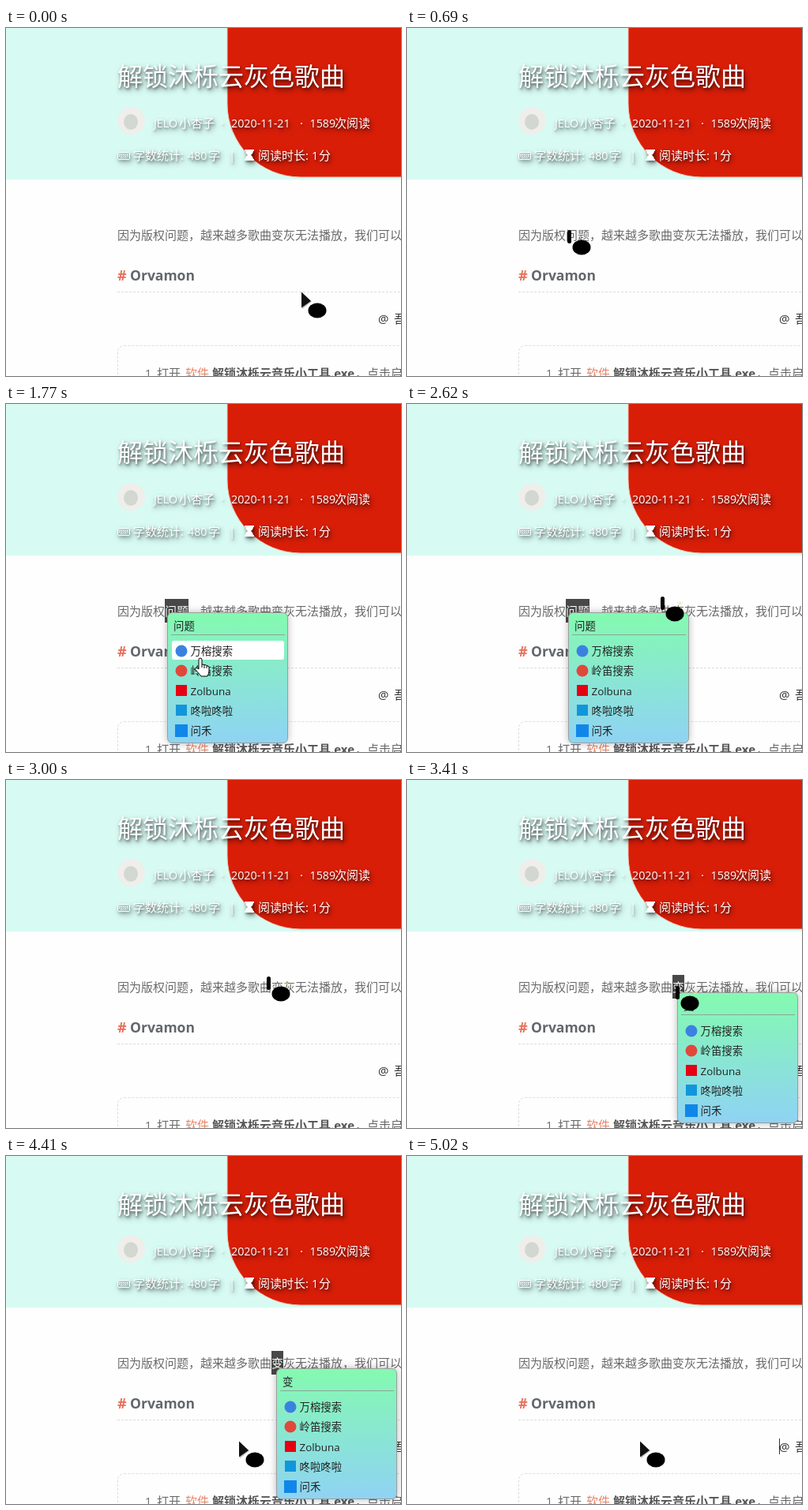
These frames come from a looping animation (500 by 441 pixels, 5.25 s). An HTML page:

```html
<!DOCTYPE html>
<html lang="zh-CN">
<head>
<meta charset="utf-8">
<style>
html, body { margin: 0; width: 100%; height: 100%; overflow: hidden; background: #fefefe; }
svg { display: block; width: 500px; height: 441px; }
text { font: 15px 'Open Sans', 'Noto Sans CJK SC', 'Noto Sans CJK', sans-serif; fill: #696969; white-space: pre; }
#head text { fill: #fff; }
#head .title { font-size: 32px; }
#head { filter: drop-shadow(1px 2px 1.5px rgba(0,0,0,.4)) drop-shadow(2px 3px 3px rgba(0,0,0,.45)); }
.num { font-size: 14.3px; }
.bold { font-weight: 700; fill: #555; }
.dark { font-weight: 500; fill: #333; }
.dash { fill: none; stroke: #dcdcdc; stroke-dasharray: 3 2; }
#pick { fill: #fff; }
#menu text { font-size: 13.4px; fill: #222; }
#panel { filter: drop-shadow(0 0 5px rgba(0,0,0,.28)); }
</style>
</head>
<body>
<svg viewBox="0 0 500 441">
  <defs>
    <linearGradient id="mint" x2="0" y2="1">
      <stop stop-color="#84fab0"/><stop offset="1" stop-color="#8fd3f4"/>
    </linearGradient>
  </defs>

  <rect width="500" height="192" fill="#d7fbf3"/>
  <rect x="280" y="-300" width="489" height="489" rx="93" fill="#d91e08" stroke="#f3c4b8"/>
  <g id="head">
    <text class="title" x="141" y="73">解锁沐栎云灰色歌曲</text>
    <text class="num" x="187" y="125.500">JELO</text>
    <text x="219" y="125.500">小杏子</text>
    <text x="272" y="125.500">·</text>
    <text class="num" x="285" y="125.500">2020-11-21</text>
    <text x="372" y="125.500">·</text>
    <text class="num" x="384.500" y="125.500">1589</text>
    <text x="416" y="125.500">次阅读</text>
    <rect x="141.500" y="157.500" width="15" height="9" rx="1" fill="none" stroke="#fff"/>
    <path d="M143 160.500h12M143 162.500h12M145 164.500h8" stroke="#fff" stroke-dasharray="1.5 1"/>
    <text x="161" y="166.500">字数统计:</text>
    <text class="num" x="230" y="166.500">480</text>
    <text x="256" y="166.500">字</text>
    <text x="282" y="166.500">|</text>
    <path d="M302 154h12v2h-1q0 3-3 5 3 2 3 5h1v2h-12v-2h1q0-3 3-5-3-2-3-5h-1z" fill="#fff"/>
    <text x="319" y="166.500">阅读时长:</text>
    <text class="num" x="387" y="166.500">1</text>
    <text x="396" y="166.500">分</text>
  </g>
  <circle cx="158.500" cy="117.500" r="17.500" fill="#efeeea"/>
  <ellipse cx="158" cy="119" rx="9" ry="10" fill="#d3d7d1"/>

  <text x="141" y="268">因为版权问题，越来越多歌曲变灰无法播放，我们可以</text>
  <text x="141" y="320" style="font-size:18px;fill:#e8705c" class="bold">#</text>
  <text x="157" y="320" style="font-size:17.5px;fill:#63666b" class="bold">Orvamon</text>
  <path class="dash" d="M141 334.500H500"/>
  <text class="dark" x="471" y="374">@</text>
  <text class="dark" x="491" y="374">吾</text>
  <rect class="dash" x="141.500" y="402.500" width="400" height="90" rx="8"/>
  <text class="num" x="176" y="443">1.</text>
  <text x="191" y="443">打开</text>
  <text x="227" y="443" style="fill:#e88468">软件</text>
  <text class="bold" x="261" y="443">解锁沐栎云音乐小工具.exe</text>
  <text x="442" y="443">，点击启</text>

  <g id="sel">
    <rect id="mark" y="247" height="30" fill="#484848"/>
    <text id="pick" y="268"></text>
  </g>
  <path id="caret" d="M471.500 358v20" stroke="#333"/>

  <g id="menu">
    <rect id="panel" x=".5" y=".5" width="152" height="165" rx="6" fill="url(#mint)" stroke="#9a9f9c"/>
    <text id="word" x="8" y="22"></text>
    <path d="M5 28.500H149" stroke="#8aa596"/>
    <rect id="hover" x="6" width="142" height="24" rx="3" fill="#fff"/>
    <circle cx="18" cy="49" r="7.500" fill="#3b82e0"/>
    <circle cx="18" cy="74" r="7.500" fill="#e0483c"/>
    <rect x="11" y="92" width="14" height="14" fill="#e60012"/>
    <rect x="11" y="117" width="14" height="14" fill="#1296db"/>
    <rect x="10" y="142" width="16" height="16" fill="#1087e8"/>
    <text x="29.500" y="54">万榕搜索</text>
    <text x="29.500" y="79">岭笛搜索</text>
    <text x="29.500" y="104.500">Zolbuna</text>
    <text x="29.500" y="130">咚啦咚啦</text>
    <text x="29.500" y="155">问禾</text>
  </g>

  <g id="cursor">
    <g id="arrow">
      <path d="M1 1V21L13 11.500Z" fill="#bbb"/>
      <path d="M0-.5V19.500L12 11Z" fill="#111"/>
      <ellipse cx="20" cy="23" rx="11.500" ry="9.500"/>
    </g>
    <g id="beam">
      <rect width="5" height="17" rx="2.500"/>
      <ellipse cx="18" cy="22" rx="11.500" ry="9.500"/>
      <path id="spark" d="M21 7l3 3 1-4M25 10l3-3" fill="none" stroke="#e8e29a"/>
    </g>
    <path id="hand" d="M-2 2a2 2 0 0 1 4 0v6q5 0 9 3v5q0 3-2 7h-8q-4-5-8-9 1-3 5 0zM2 8v4M5 9v4M8 10v3" fill="#fff" stroke="#000"/>
    <path id="plain" d="M.5.5v13l3-3 2 5 2-1-2-4.500h4z" fill="#fff" stroke="#000"/>
  </g>
</svg>
<script>
const LOOP = 5250;
const $ = id => document.getElementById(id);
const show = (id, on) => $(id).style.display = on ? '' : 'none';
const clamp = v => Math.max(0, Math.min(1, v));

// start, step length, steps, target x, target y
const moves = [
  [150, 76.6, 7, 210, 256],
  [690, 1, 1, 203, 256],
  [1540, 76.6, 4, 246, 322],
  [1850, 80, 3, 250, 359],
  [2080, 80, 2, 291, 271],
  [2470, 75, 3, 321, 244],
  [2770, 80, 7, 341, 256],
  [3320, 1, 1, 340, 261],
  [3870, 76.6, 4, 378, 338],
  [4176, 76.6, 3, 312, 361],
  [4410, 1, 1, 295, 362]
];

const picks = [
  { word: '问题', at: 840, full: 1160, close: 2770, x: 204, y: 264, left: 201 },
  { word: '变', at: 3250, full: 3410, close: 4790, x: 342, y: 269, left: 336 }
];

function pointer(t) {
  let x = 374, y = 335;
  for (const [start, len, n, tx, ty] of moves) {
    if (t < start) break;
    const p = Math.min(n, Math.floor((t - start) / len) + 1) / n;
    x += (tx - x) * p;
    y += (ty - y) * p;
  }
  return [Math.round(x), Math.round(y)];
}

function draw(t) {
  const [x, y] = pointer(t);
  const p = t < 3250 ? picks[0] : picks[1];
  const open = t >= p.at && t < p.close;
  const alpha = Math.min(clamp((t - p.at) / (p.full - p.at)), clamp(1 - (t - p.close) / 230));

  show('sel', open);
  $('mark').setAttribute('x', p.left);
  $('mark').setAttribute('width', 15 * p.word.length);
  $('pick').setAttribute('x', p.left);
  $('pick').textContent = $('word').textContent = p.word;

  $('menu').setAttribute('transform', `translate(${p.x} ${p.y})`);
  $('menu').style.opacity = alpha;

  const inside = open && x >= p.x && x < p.x + 153 && y >= p.y && y < p.y + 166;
  const row = inside ? Math.floor((y - p.y - 35.5) / 25.2) : -1;
  show('hover', row >= 0);
  $('hover').setAttribute('y', 36 + Math.round(row * 25.2));

  const kind = inside ? (row >= 0 ? 'hand' : 'plain') : y < 280 ? 'beam' : 'arrow';
  for (const k of ['arrow', 'beam', 'hand', 'plain']) show(k, k === kind);
  show('spark', t > 2400);
  $('cursor').setAttribute('transform', `translate(${x} ${y})`);
  show('caret', t >= 4790);
}

const begin = performance.now();
function tick() {
  draw((performance.now() - begin) % LOOP);
  requestAnimationFrame(tick);
}
tick();
</script>
</body>
</html>
```
